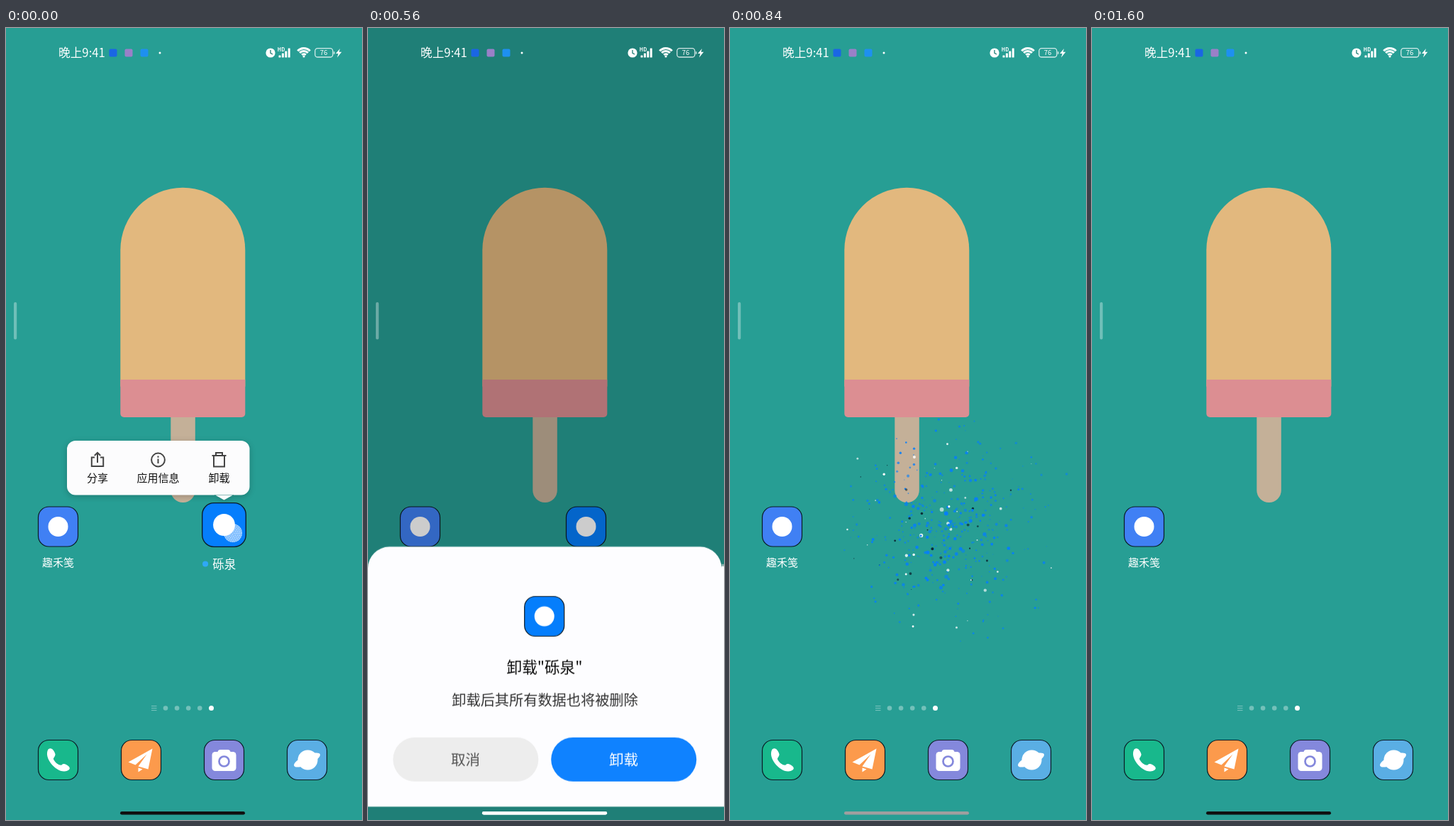
An HTML page with a canvas that plays this animation: 502 px wide and 1115 px high, repeating every 1.64 s.

```html
<!DOCTYPE html>
<html lang="zh-CN">
<head>
<meta charset="utf-8">
<title>卸载动画</title>
<style>
html, body { margin: 0; width: 100%; height: 100%; overflow: hidden; background: #279e94; }
canvas { display: block; width: 502px; height: 1115px; }
</style>
</head>
<body>
<canvas id="stage"></canvas>
<script>
const W = 502, H = 1115, LOOP = 1640, STEP = 40;
const FONT = '"Noto Sans CJK SC", "Noto Sans CJK", "Noto Sans", sans-serif';
const APP_A = '趣禾笺', APP_B = '砾泉';
const BLUE = '#057efc';
const ratio = window.devicePixelRatio || 1;

function prepare(canvas) {
  canvas.width = Math.round(W * ratio);
  canvas.height = Math.round(H * ratio);
  return canvas.getContext('2d');
}

const screen2d = prepare(document.getElementById('stage'));
const layer2d = prepare(document.createElement('canvas'));
let ctx = screen2d;

const clamp = (v, lo = 0, hi = 1) => Math.min(hi, Math.max(lo, v));
const progress = (t, start, length) => clamp((t - start) / length);
const smooth = u => u * u * (3 - 2 * u);

function at(x, y, scale, alpha, draw) {
  ctx.save();
  ctx.translate(x, y);
  ctx.scale(scale, scale);
  ctx.globalAlpha *= alpha;
  draw();
  ctx.restore();
}

function box(x, y, w, h, r, color) {
  ctx.beginPath();
  ctx.roundRect(x, y, w, h, r);
  ctx.fillStyle = color;
  ctx.fill();
}

function disc(x, y, r, color) {
  ctx.beginPath();
  ctx.arc(x, y, r, 0, 7);
  ctx.fillStyle = color;
  ctx.fill();
}

function shape(d, color) {
  ctx.fillStyle = color;
  ctx.fill(new Path2D(d));
}

function line(d, color, width) {
  ctx.strokeStyle = color;
  ctx.lineWidth = width;
  ctx.stroke(new Path2D(d));
}

// Text is centred on (x, y) unless another alignment is given.
function text(str, x, y, size, color, weight = 400, align = 'center') {
  ctx.font = `${weight} ${size}px ${FONT}`;
  ctx.textAlign = align;
  ctx.fillStyle = color;
  ctx.fillText(str, x, y + size * 0.38);
}

function tile(color, glyph) {
  box(-28, -28, 56, 56, 15, color);
  ctx.strokeStyle = '#0b1a24';
  ctx.lineWidth = 1.2;
  ctx.stroke();
  glyph();
}

const plainMark = () => disc(0, 0, 14, '#fff');

const dock = [
  ['#18b88c', () => shape('M-14-15C-9-19-5-12-4-8C-4-4-8-3-6 0C-3 5 2 8 5 7C8 4 11 6 15 9C19 13 13 16 9 16C-3 17-21-3-14-15Z', '#fff')],
  ['#fc9a4c', () => shape('M16-16L-18 3L-8 7L8-8L-4 9L10 13ZM-4 11L2 13L-4 17Z', '#fff')],
  ['#8488dc', () => {
    box(-9, -14.5, 18, 10, 4, '#fff');
    box(-17, -11.5, 34, 27, 4.5, '#fff');
    ctx.beginPath();
    ctx.arc(0, 2, 7, 0, 7);
    ctx.strokeStyle = '#8488dc';
    ctx.lineWidth = 2.7;
    ctx.stroke();
  }],
  ['#5aaee4', () => {
    ctx.beginPath();
    ctx.ellipse(0, 0, 20, 6.5, -0.42, 0, 7);
    ctx.fillStyle = '#fff';
    ctx.fill();
    disc(1, 0, 14, '#fff');
  }]
];

function wallpaper() {
  ctx.fillStyle = '#279e94';
  ctx.fillRect(0, 0, W, H);
  box(232.3, 540, 34.5, 128, [0, 0, 17, 17], '#c4b098');
  box(161.3, 224.7, 176, 280, [88, 88, 0, 0], '#e2b87e');
  box(161.3, 495, 176, 53, [0, 0, 5, 5], '#dc8e92');
}

function targetApp(scale, alpha) {
  at(307.5, 727, scale, alpha, () => {
    at(0, -25, 1, 1, () => tile(BLUE, plainMark));
    disc(-24, 25, 3.7, '#2fa8f5');
    text(APP_B, 0.3, 25, 15, '#fff');
  });
}

function launcher() {
  at(73.5, 702, 1, 1, () => tile('#4080f4', plainMark));
  text(APP_A, 73.5, 752, 15, '#fff');
  const faint = 'rgba(255,255,255,.36)';
  for (let i = 0; i < 3; i++) box(205, 954 + i * 3, 7.5, 1.1, 0, faint);
  for (let i = 0; i < 4; i++) disc(225 + i * 16.1, 957.5, 3.3, faint);
  disc(289.5, 957.5, 3.5, '#fff');
  dock.forEach(([color, glyph], i) =>
    at(73.5 + i * 117, 1030.5, 1, 1, () => tile(color, glyph)));
}

function statusBar() {
  text('晚上9:41', 74, 35, 16.7, '#fff', 500, 'left');
  ['#1a66e4', '#9a80c8', '#1e90f0'].forEach((c, i) => box(145.5 + i * 22, 29.5, 11, 11, 2, c));
  disc(217, 35, 1.5, '#fff');
  disc(373, 35, 6.6, '#fff');
  line('M373 31V35.3L376 37', '#1f7e76', 1.3);
  text('HD', 388, 30, 7, '#fff', 700);
  [3, 6, 9, 13].forEach((h, i) => box(384.5 + i * 4.4, 41.5 - h, 3, h, 0.6, '#fff'));
  [3.8, 8, 12].forEach(r => {
    ctx.beginPath();
    ctx.arc(420, 40.5, r, -Math.PI * 0.76, -Math.PI * 0.24);
    ctx.strokeStyle = '#fff';
    ctx.lineWidth = 3;
    ctx.stroke();
  });
  disc(420, 40, 1.6, '#fff');
  ctx.beginPath();
  ctx.roundRect(435.8, 28.6, 25, 12.4, 3.6);
  ctx.strokeStyle = 'rgba(255,255,255,.8)';
  ctx.lineWidth = 1.3;
  ctx.stroke();
  box(462, 33, 1.4, 4, 0.7, 'rgba(255,255,255,.8)');
  text('76', 448, 34.8, 9.5, '#fff');
  shape('M471 29L465 36H468.6L467 41.5L473.3 33.8H469.6Z', '#fff');
}

function popup() {
  ctx.save();
  ctx.shadowColor = 'rgba(0,0,0,.22)';
  ctx.shadowBlur = 8 * ratio;
  ctx.shadowOffsetY = 2 * ratio;
  const outline = new Path2D('M294 657L307.5 664.5L321 657Z');
  outline.roundRect(86, 581, 257.5, 76.5, 12);
  ctx.fillStyle = '#fcfcfd';
  ctx.fill(outline);
  ctx.restore();

  const ink = '#444';
  line('M125 604.5H120.8V617H137.2V604.5H133M129 612V598M124.8 602L129 597.8L133.2 602', ink, 2);
  ctx.beginPath();
  ctx.arc(214.5, 608, 9.4, 0, 7);
  ctx.stroke();
  line('M214.5 606.5V613M214.5 602.5V604.7', ink, 2);
  line('M290.5 602H310.5M296 602V598H305V602M293 602V617.5H308V602', ink, 2);
  text('分享', 129, 633.5, 15, '#111', 500);
  text('应用信息', 214.5, 633.5, 15, '#111', 500);
  text('卸载', 300.5, 633.5, 15, '#111', 500);
}

function touchPointer() {
  at(320, 711, 1, 1, () => {
    disc(0, 0, 13, 'rgba(255,255,255,.5)');
    ctx.setLineDash([1.2, 1.6]);
    ctx.strokeStyle = 'rgba(255,255,255,.55)';
    ctx.lineWidth = 1.2;
    for (let r = 2; r < 13; r += 2.6) {
      ctx.beginPath();
      ctx.arc(0, 0, r, 0, 7);
      ctx.stroke();
    }
  });
}

function dialogContent() {
  const panel = new Path2D();
  panel.roundRect(0, 729.6, 498.5, 365.9, [30, 30, 0, 0]);
  panel.rect(498.5, 757, 4, 338.5);
  ctx.fillStyle = '#fdfdff';
  ctx.fill(panel);
  box(498.5, 754, 4, 3, 0, 'rgba(190,200,200,.7)');
  at(248.7, 827.5, 1, 1, () => tile(BLUE, plainMark));
  text(`卸载"${APP_B}"`, 249, 899, 21.6, '#0c0c0c');
  text('卸载后其所有数据也将被删除', 249.5, 945, 20.2, '#333');
  box(35.3, 998, 205, 62, 31, '#ededed');
  text('取消', 137.5, 1029.5, 20.5, '#555', 500);
  box(258.2, 998, 205, 62, 31, '#0f82ff');
  text('卸载', 360.5, 1029.5, 20.5, '#fff', 500);
}

// The dialog is painted once on its own layer, so that it fades as a whole.
function paintDialogLayer() {
  ctx = layer2d;
  ctx.scale(ratio, ratio);
  dialogContent();
  ctx = screen2d;
}

function dialog(offset, alpha) {
  at(0, offset, 1, alpha, () => ctx.drawImage(layer2d.canvas, 0, 0, W, H));
}

function seeded(seed) {
  return () => {
    seed = (seed * 1664525 + 1013904223) >>> 0;
    return seed / 4294967296;
  };
}

const random = seeded(71);
const particles = Array.from({ length: 440 }, () => {
  const stamina = random() ** 2, kind = random();
  return {
    angle: random() * Math.PI * 2,
    reach: 168 * random() ** 0.65 * (1 - 0.5 * stamina),
    x: (random() - 0.5) * 50,
    y: (random() - 0.5) * 50,
    life: 315 + 190 * stamina,
    size: 1.2 + 3.6 * random(),
    alpha: 0.55 + 0.45 * random(),
    color: kind < 0.85 ? BLUE : kind < 0.95 ? '#fff' : '#0a2430'
  };
});

function burst(t) {
  const age = t - 640;
  if (age <= 0) return;
  for (const p of particles) {
    const u = age / p.life;
    if (u >= 1) continue;
    const d = p.reach * (1 - (1 - u) ** 3);
    ctx.globalAlpha = p.alpha * Math.min(1, 2.5 * (1 - u));
    disc(306 + p.x + Math.cos(p.angle) * d, 704 + p.y + Math.sin(p.angle) * d,
      Math.max(0.5, p.size * (1 - u)), p.color);
  }
  ctx.globalAlpha = 1;
}

function homeBar(t) {
  let level = 16;
  if (t >= 600) level = Math.max(16, 255 * (1 - progress(t, 560, 1040)) ** 1.5);
  else if (t >= 40) level = Math.min(255, 190 + (t - 40) * 0.3);
  const v = Math.round(level);
  box(161, 1103, 176, 4.6, 2.3, `rgb(${v},${v},${v})`);
}

function render(t) {
  ctx.setTransform(ratio, 0, 0, ratio, 0, 0);
  const menuOpen = t < 40;
  wallpaper();
  launcher();

  if (menuOpen) {
    popup();
    targetApp(1.1, 1);
    touchPointer();
  } else {
    const gone = progress(t, 560, 88);
    if (gone < 1) targetApp(1 - 0.15 * gone, 1 - gone);
    burst(t);
    const dim = 0.2 * (1 - progress(t, 560, 160));
    ctx.fillStyle = `rgba(0,0,0,${dim})`;
    ctx.fillRect(0, 0, W, H);
  }

  box(11, 386, 4.2, 52.5, 2.1, 'rgba(255,255,255,.34)');
  statusBar();
  homeBar(t);
  const exit = smooth(progress(t, 555, 200));
  if (!menuOpen && exit < 1) dialog(382 * exit, 1 - exit * exit);
  if (!menuOpen && exit < 0.05) homeBar(t);
}

paintDialogLayer();
const started = performance.now();
function tick() {
  const t = (performance.now() - started) % LOOP;
  render(Math.floor(t / STEP) * STEP);
  requestAnimationFrame(tick);
}
tick();
</script>
</body>
</html>
```
